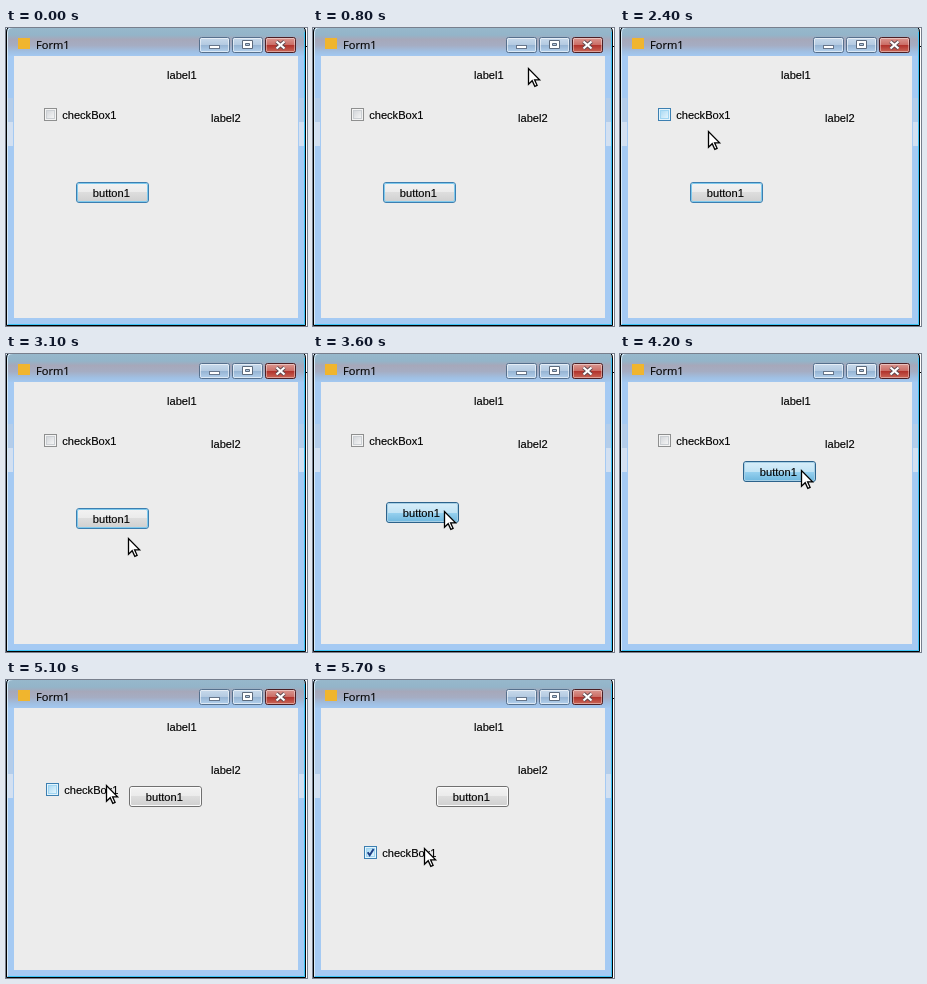
Write an HTML page that moves like this. It is 301 px wide and 298 px high and loops after 7300 ms.

```html
<!DOCTYPE html>
<html lang="en">
<head>
<meta charset="utf-8">
<title>Form1</title>
<style>
html, body { margin: 0; width: 100%; height: 100%; overflow: hidden; background: #fff; }
svg { display: block; width: 100vw; height: 100vh; }
text { font: 11.1px "Liberation Sans", Arial, sans-serif; fill: #000; stroke: #000; stroke-width: .15; }
.title { font: 11.1px "Open Sans", "Noto Sans", sans-serif; }
</style>
</head>
<body>
<svg viewBox="0 0 301 298" preserveAspectRatio="none">
  <defs>
    <linearGradient id="bar" x2="0" y2="1">
      <stop offset="0" stop-color="#98b9cc"/><stop offset=".3" stop-color="#93b4c9"/>
      <stop offset=".45" stop-color="#a6a8ba"/><stop offset=".65" stop-color="#a5adc3"/>
      <stop offset=".85" stop-color="#a0bfe2"/><stop offset="1" stop-color="#a3c8f0"/>
    </linearGradient>
    <linearGradient id="cap" x2="0" y2="1">
      <stop offset="0" stop-color="#c9dbec"/><stop offset=".48" stop-color="#b4cae1"/>
      <stop offset=".5" stop-color="#95b3d2"/><stop offset="1" stop-color="#b5d2ee"/>
    </linearGradient>
    <linearGradient id="close" x2="0" y2="1">
      <stop offset="0" stop-color="#dc9a94"/><stop offset=".48" stop-color="#cb6e66"/>
      <stop offset=".5" stop-color="#b0302a"/><stop offset="1" stop-color="#cc6a5a"/>
    </linearGradient>
    <linearGradient id="plain" x2="0" y2="1">
      <stop offset="0" stop-color="#f3f3f3"/><stop offset=".48" stop-color="#ebebeb"/>
      <stop offset=".5" stop-color="#dddddd"/><stop offset="1" stop-color="#cfcfcf"/>
    </linearGradient>
    <linearGradient id="hot" x2="0" y2="1">
      <stop offset="0" stop-color="#eaf6fd"/><stop offset=".48" stop-color="#d9f0fc"/>
      <stop offset=".5" stop-color="#bee6fd"/><stop offset="1" stop-color="#a7d9f5"/>
    </linearGradient>
    <linearGradient id="down" x2="0" y2="1">
      <stop offset="0" stop-color="#d9eef9"/><stop offset=".53" stop-color="#c0e3f5"/>
      <stop offset=".55" stop-color="#94cfee"/><stop offset="1" stop-color="#6db6dd"/>
    </linearGradient>
    <linearGradient id="tick" x2="1" y2="1">
      <stop offset="0" stop-color="#d2d5d9"/><stop offset="1" stop-color="#f6f6f6"/>
    </linearGradient>
    <linearGradient id="tickHot" x2="1" y2="1">
      <stop offset="0" stop-color="#a9d9f3"/><stop offset="1" stop-color="#e6f6fd"/>
    </linearGradient>
  </defs>

  <!-- window frame, its top edge just above the stage -->
  <path d="M0 298V4Q0 -2 6 -2H294Q300 -2 300 4V298Z" fill="#a5caf3"/>
  <path d="M0 28V4Q0 -2 6 -2H294Q300 -2 300 4V28Z" fill="url(#bar)"/>
  <path d="M2 70H7V94H2ZM293 70H298V94H293Z" fill="#b4cdea"/>
  <path d="M2 94H7V118H2ZM293 94H298V118H293Z" fill="#d3e0f1"/>
  <path d="M1.5 296V5Q1.5 -.5 7 -.5" fill="none" stroke="#d9ebf8"/>
  <path d="M298.5 4V296.5H2" fill="none" stroke="#3cc3f5"/>
  <path d="M.5 297.5V4Q.5 -1.5 6 -1.5H294Q299.5 -1.5 299.5 4V297.5Z" fill="none" stroke="#000"/>
  <path d="M300 18H301V19H300Z"/>
  <path d="M8 28H292V290H8Z" fill="#ececec"/>

  <rect x="12" y="10" width="12" height="11" fill="#f0b52e"/>
  <text class="title" x="30" y="21">Form1</text>

  <g stroke="#56708d">
    <rect x="193.5" y="9.5" width="30" height="15" rx="2" fill="url(#cap)"/>
    <rect x="226.5" y="9.5" width="30" height="15" rx="2" fill="url(#cap)"/>
    <rect x="259.5" y="9.5" width="30" height="15" rx="2" fill="url(#close)" stroke="#4c1f24"/>
  </g>
  <g fill="none" stroke="#fff" stroke-opacity=".55">
    <rect x="194.5" y="10.5" width="28" height="13" rx="1"/>
    <rect x="227.5" y="10.5" width="28" height="13" rx="1"/>
    <rect x="260.5" y="10.5" width="28" height="13" rx="1" stroke-opacity=".4"/>
  </g>
  <rect x="203.5" y="17.5" width="10" height="3" fill="#fff" stroke="#66758a"/>
  <path d="M236.5 12.5H246.5V20.5H236.5ZM239.5 15.5H243.5V17.5H239.5Z" fill="#fff" fill-rule="evenodd" stroke="#5c6a7c"/>
  <g fill="none">
    <path d="M270.5 13.5L278.5 20.5M278.5 13.5L270.5 20.5" stroke="#5e4a50" stroke-width="4"/>
    <path d="M270.5 13.5L278.5 20.5M278.5 13.5L270.5 20.5" stroke="#fff" stroke-width="2.2"/>
  </g>

  <text x="161" y="51">label1</text>
  <text x="205" y="94">label2</text>

  <g id="button">
    <rect id="face" x=".5" y=".5" width="72" height="20" rx="2.5"/>
    <rect id="rim" x="1.5" y="1.5" width="70" height="18" rx="1.5"/>
    <text x="16.8" y="15">button1</text>
  </g>

  <g id="check">
    <rect id="box" x=".5" y=".5" width="12" height="12"/>
    <rect id="well" x="2.5" y="2.5" width="8" height="8"/>
    <path id="mark" d="M3.7 6.2L5.7 9.2L9.6 3" fill="none" stroke="#1c3f86" stroke-width="2"/>
    <text x="18.2" y="11">checkBox1</text>
  </g>

  <path id="cursor" d="M.5 .5V16.2L4.2 12.7L6.8 18.3L9.1 17.3L6.6 11.8H11.6Z" fill="#fff" stroke="#000" stroke-width="1.3"/>
</svg>

<script>
const LOOP = 7300;
const $ = id => document.getElementById(id);

// time, pointer x, pointer y, button look, checkbox hovered
const steps = [
  [0, 320, 45, "focus", 0],
  [600, 290, 45, "focus", 0],
  [800, 215, 40, "focus", 0],
  [1000, 140, 46, "focus", 0],
  [1200, 85, 55, "focus", 0],
  [1400, 51, 67, "focus", 0],
  [1600, 60, 101, "focus", 0],
  [1800, 62, 91, "focus", 1],
  [2000, 70, 88, "focus", 1],
  [2200, 79, 93, "focus", 1],
  [2400, 88, 103, "focus", 1],
  [2700, 92, 140, "focus", 0],
  [2900, 104, 200, "focus", 0],
  [3100, 122, 184, "focus", 0],
  [3200, 128, 166, "hot", 0],
  [3400, 128, 163, "down", 0],
  [3600, 131, 157, "down", 0],
  [3800, 148, 143, "down", 0],
  [4000, 168, 126, "down", 0],
  [4200, 181, 116, "down", 0],
  [4400, 150, 97, "glow", 0],
  [4600, 115, 80, "glow", 1],
  [4800, 98, 82, "glow", 1],
  [4900, 98, 82, "plain", 1],
  [5100, 100, 105, "plain", 1],
  [5300, 104, 135, "plain", 1],
  [5500, 109, 160, "plain", 1],
  [5700, 111, 168, "plain", 1]
];

// fill, border, inner rim
const looks = {
  plain: ["plain", "#707070", "#fafafa"],
  focus: ["plain", "#3c7fb1", "#7fc9ec"],
  glow: ["plain", "#3280bb", "#48bdf0"],
  hot: ["hot", "#3c7fb1", "#f2faff"],
  down: ["down", "#2c628b", "#a5cfe5"]
};

function place(id, x, y) {
  $(id).setAttribute("transform", `translate(${x} ${y})`);
}

function paint(id, fill, stroke) {
  $(id).setAttribute("fill", fill);
  $(id).setAttribute("stroke", stroke);
}

function draw(t) {
  const [, x, y, look, hover] = steps.findLast(s => s[0] <= t);
  const [fill, edge, rim] = looks[look];

  place("cursor", x, y);
  if (t < 3600) place("button", 70, 154);
  else if (t < 4400) place("button", x - 58, y - 9);
  else place("button", 123, 106);
  paint("face", `url(#${fill})`, edge);
  paint("rim", "none", rim);

  if (t < 4900) place("check", 38, 80);
  else place("check", x - 60, y - 2);
  paint("box", hover ? "#e3f4fc" : "#f4f4f4", hover ? "#3c7fb1" : "#8e8f8f");
  paint("well", hover ? "url(#tickHot)" : "url(#tick)", hover ? "#9fd5f2" : "#cbcfd3");
  $("mark").setAttribute("visibility", t >= 5700 ? "visible" : "hidden");
}

const start = performance.now();
function tick() {
  draw((performance.now() - start) % LOOP);
  requestAnimationFrame(tick);
}
tick();
</script>
</body>
</html>
```
